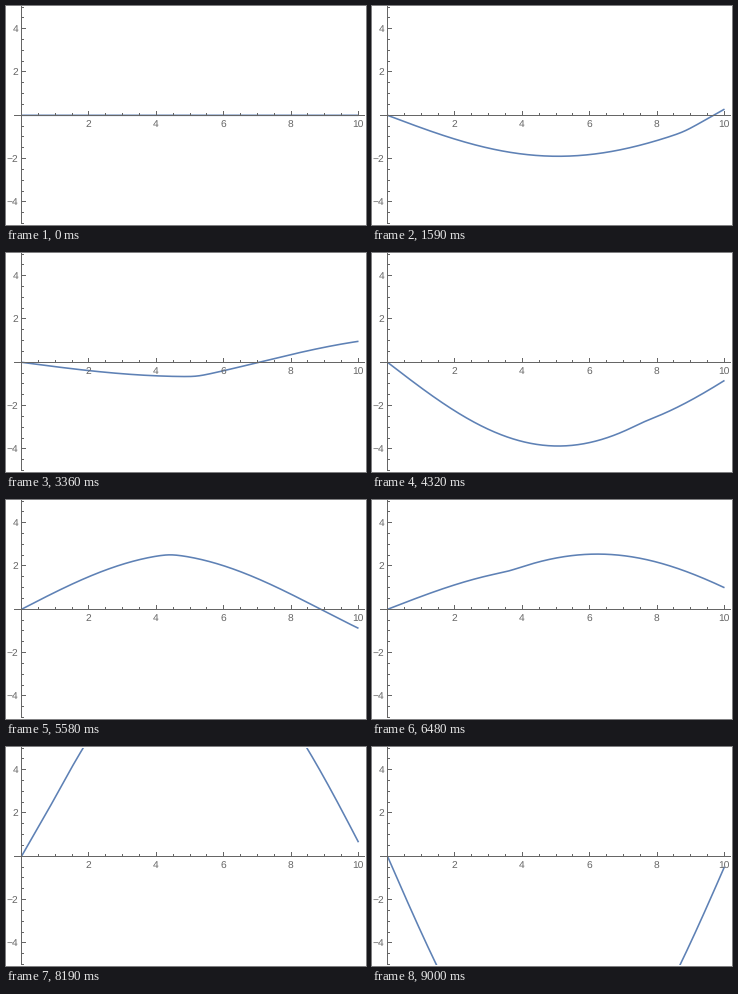
These frames come from a looping animation (360x219 px, 9.03 s). A matplotlib script:

```python
import numpy as np
import matplotlib.pyplot as plt
from matplotlib.animation import FuncAnimation
from matplotlib.patches import Rectangle

W, H, DPI = 360, 219, 64
PX = 72 / DPI                       # points per pixel
X0, Y0, SX, SY = 15.5, 109.3, 33.7, 21.66
LENGTH, SPEED, OMEGA = 10, 4, 1.24
FRAMES, INTERVAL, DT = 301, 30, 0.1
GRAY = "#666666"
BLUE = (0.368, 0.507, 0.710)

plt.rcParams["font.family"] = "Liberation Sans"
plt.rcParams["text.hinting"] = "none"


def px(x):
    return X0 + SX * np.asarray(x)


def py(y):
    return Y0 - SY * np.asarray(y)


def drive(t, delay):
    """Sine that starts at t = delay, its onset softened on the way."""
    w = 0.028 * np.minimum(delay, 1) + 1e-6
    return np.sin(OMEGA * w * np.logaddexp(0, (t - delay) / w))


def string(x, t):
    """String fixed at x = 0 and shaken at the far end."""
    u = np.zeros_like(x)
    trip = LENGTH / SPEED
    for n in range(int(t / (2 * trip)) + 2):
        mid = (2 * n + 1) * trip
        u += drive(t, mid - x / SPEED) - drive(t, mid + x / SPEED)
    return u


fig = plt.figure(figsize=(W / DPI, H / DPI), dpi=DPI, facecolor="white")
ax = fig.add_axes([0, 0, 1, 1])
ax.set(xlim=(0, W), ylim=(H, 0))
ax.axis("off")


def stroke(x1, y1, x2, y2):
    """One-pixel line centred on the pixels that hold its ends."""
    xs, ys = np.floor([x1, x2]), np.floor([y1, y2])
    ax.plot(xs + 0.5, ys + 0.5, color=GRAY, lw=PX, snap=False,
            solid_capstyle="projecting", zorder=3)


def label(x, y, value, ha):
    text = str(value).replace("-", "\u2212")
    ax.text(x, y, text, color=GRAY, size=10.3 * PX, ha=ha,
            va="center_baseline", zorder=4)


stroke(8, Y0, 358, Y0)
stroke(X0, 0, X0, 217)

for v in np.arange(0.5, 10.1, 0.5):
    major = v % 2 == 0
    x = px(v)
    stroke(x, Y0, x, Y0 - (4 if major else 2))
    if major:
        label(x - 0.5, 117.8, int(v), "center")

for v in np.arange(-5, 5.1, 0.5):
    if v == 0:
        continue
    major = v % 2 == 0
    y = py(v)
    stroke(X0, y, X0 + (4 if major else 2), y)
    if major:
        label(12.6, y - 0.6, int(v), "right")

grid = np.linspace(0, LENGTH, 401)
curve, = ax.plot([], [], color=BLUE, lw=1.6 * PX, zorder=2, snap=False,
                 solid_capstyle="butt", solid_joinstyle="round")
curve.set_clip_path(Rectangle((0, 0.5), W, 217.3, transform=ax.transData))


def update(i):
    curve.set_data(px(grid), py(string(grid, i * DT)))
    return curve,


anim = FuncAnimation(fig, update, frames=FRAMES, interval=INTERVAL,
                     repeat=True, repeat_delay=0)
plt.show()
```
